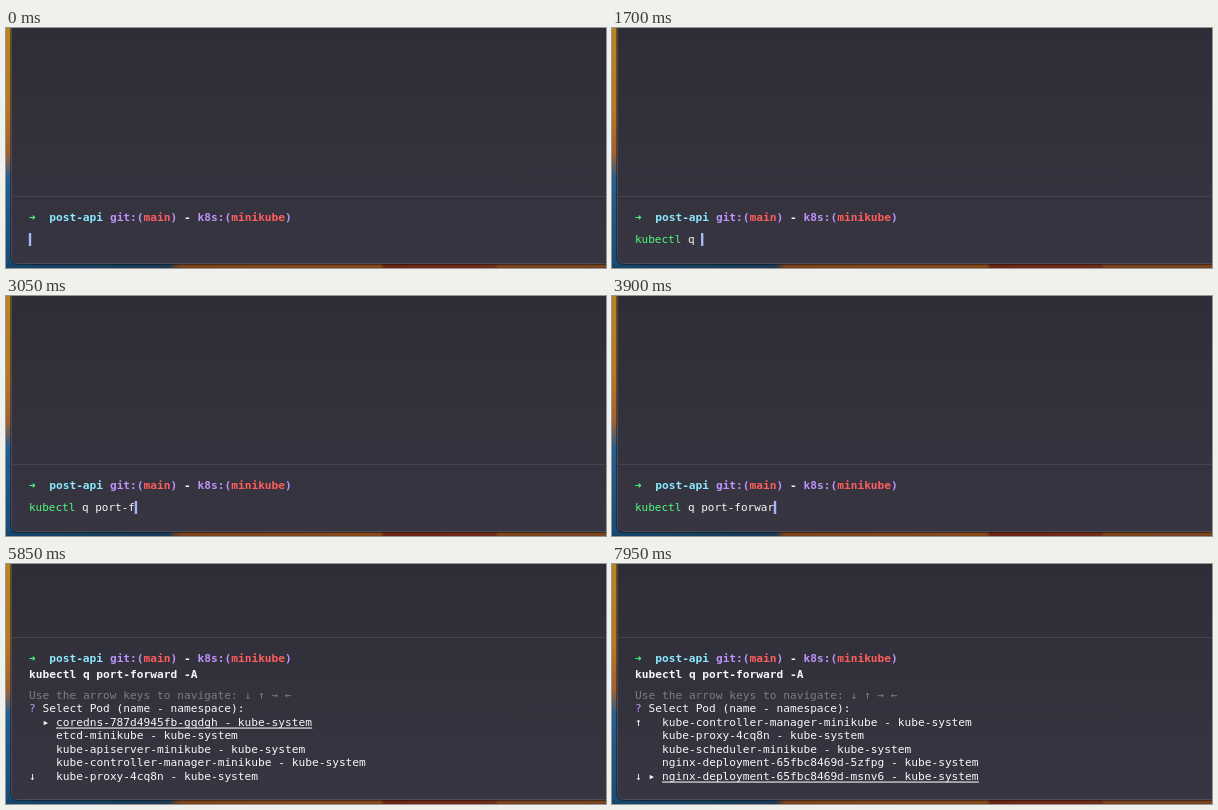
Animation of 600x240 px, one loop 8 s. Source, as an HTML page:

```html
<!DOCTYPE html>
<html lang="en">
<head>
<meta charset="utf-8">
<title>Port forward prompt</title>
<style>
  html, body { margin: 0; width: 100%; height: 100%; overflow: hidden; background: #2e2d37; }
  svg { display: block; width: 600px; height: 240px; font: 11.2px "DejaVu Sans Mono", monospace; }
  text { fill: #f7f7f9; white-space: pre; }
  .bold { font-weight: bold; }
  .input { font-size: 11px; }
  .green { fill: #50fa7b; }
  .cyan { fill: #8be9fd; }
  .purple { fill: #bd93f9; }
  .red { fill: #ff5d5d; }
  .dim { fill: #7e7d85; }
</style>
</head>
<body>
<svg viewBox="0 0 600 240">
  <defs>
    <linearGradient id="side" x2="0" y2="1">
      <stop offset="0" stop-color="#b9851f"/>
      <stop offset=".35" stop-color="#b87622"/>
      <stop offset=".52" stop-color="#a3602f"/>
      <stop offset=".63" stop-color="#235f91"/>
      <stop offset="1" stop-color="#174b74"/>
    </linearGradient>
    <linearGradient id="base">
      <stop offset="0" stop-color="#16466b"/>
      <stop offset=".27" stop-color="#173a56"/>
      <stop offset=".29" stop-color="#7b431d"/>
      <stop offset=".625" stop-color="#85481b"/>
      <stop offset=".63" stop-color="#6c2615"/>
      <stop offset=".815" stop-color="#702d18"/>
      <stop offset=".82" stop-color="#7a431d"/>
      <stop offset="1" stop-color="#774420"/>
    </linearGradient>
    <linearGradient id="pane" x2="0" y2="1">
      <stop offset="0" stop-color="#2e2d37"/>
      <stop offset="1" stop-color="#373541"/>
    </linearGradient>
  </defs>
  <rect width="600" height="240" fill="url(#side)"/>
  <rect y="235" width="600" height="5" fill="url(#base)"/>
  <rect x="5.5" y="-10" width="610" height="245.5" rx="6" stroke="#000" stroke-opacity=".4" stroke-width="3"/>
  <rect x="5.5" y="-10" width="610" height="245.5" rx="6" fill="url(#pane)" stroke="#4c4a52"/>

  <g id="header">
    <path d="M6 .5H600" stroke="#45444e"/>
    <g class="bold">
      <text class="green" x="23" y="25">➜</text>
      <text class="cyan" x="43.2" y="25">post-api</text>
      <text x="103.9" y="25" class="purple">git:(<tspan class="red">main</tspan>)</text>
      <text x="178" y="25">-</text>
      <text x="191.5" y="25" class="purple">k8s:(<tspan class="red">minikube</tspan>)</text>
    </g>
  </g>

  <g id="editor">
    <text class="input" x="23" y="215"><tspan id="command" class="green"></tspan><tspan id="args"></tspan></text>
    <rect id="cursor" y="205" width="2.4" height="13" fill="#a6b5f5"/>
  </g>

  <g id="menu">
    <text class="bold" x="23" y="114">kubectl q port-forward -A</text>
    <text class="dim" x="23" y="134.5">Use the arrow keys to navigate: ↓ ↑ → ←</text>
    <text x="23" y="148"><tspan class="purple">?</tspan> Select Pod (name - namespace):</text>
    <g id="rows"></g>
    <text id="more-up" x="23" y="161.5">↑</text>
    <text x="23" y="215.5">↓</text>
    <text id="pointer" x="36.5">▸</text>
    <rect id="underline" x="50" height="1.1" fill="#f1f1f3"/>
  </g>
</svg>
<script>
  const LOOP = 8000, SUBMIT = 5450, ROWS = 5;
  const INPUT_ADVANCE = 6.62, LIST_ADVANCE = 6.743;
  const FIRST_ROW = 161.5, ROW_HEIGHT = 13.5;
  const line = 'kubectl q port-forward -A';
  const commandLength = line.indexOf(' ');
  const keyTimes = [
    100, 190, 280, 370, 460, 550, 640,
    1300, 1450, 1640, 1900, 2100, 2300,
    2500, 2750, 2950, 3150, 3320, 3500, 3700, 3850,
    4050, 4300, 4600, 4800
  ];
  const moveTimes = [6150, 6430, 6710, 6990, 7270, 7550, 7800];
  const pods = [
    'coredns-787d4945fb-gqdgh', 'etcd-minikube', 'kube-apiserver-minikube',
    'kube-controller-manager-minikube', 'kube-proxy-4cq8n', 'kube-scheduler-minikube',
    'nginx-deployment-65fbc8469d-5zfpg', 'nginx-deployment-65fbc8469d-msnv6'
  ].map(name => name + ' - kube-system');

  const el = id => document.getElementById(id);
  const show = (id, on) => el(id).setAttribute('visibility', on ? 'visible' : 'hidden');
  const set = (id, name, value) => el(id).setAttribute(name, value);
  const countPast = (times, t) => times.filter(time => time <= t).length;
  const rowY = i => FIRST_ROW + i * ROW_HEIGHT;

  const rows = Array.from({ length: ROWS }, (_, i) => {
    const row = document.createElementNS('http://www.w3.org/2000/svg', 'text');
    row.setAttribute('x', 50);
    row.setAttribute('y', rowY(i));
    return el('rows').appendChild(row);
  });

  function drawEditor(t) {
    const typed = countPast(keyTimes, t);
    const idle = t - (keyTimes[typed - 1] || 0);
    el('command').textContent = line.slice(0, Math.min(typed, commandLength));
    el('args').textContent = line.slice(commandLength, Math.max(typed, commandLength));
    set('cursor', 'x', 22.8 + typed * INPUT_ADVANCE);
    set('cursor', 'opacity', idle % 500 < 250 ? 1 : 0);
  }

  function drawMenu(t) {
    const selected = countPast(moveTimes, t);
    const top = Math.max(0, selected - ROWS + 1);
    const y = rowY(selected - top);
    rows.forEach((row, i) => { row.textContent = pods[top + i]; });
    show('more-up', top > 0 && t >= SUBMIT);
    set('pointer', 'y', y);
    set('underline', 'y', y + 2);
    set('underline', 'width', pods[selected].length * LIST_ADVANCE);
  }

  function frame() {
    const t = performance.now() % LOOP;
    const submitted = t >= SUBMIT;
    show('editor', !submitted);
    show('menu', submitted);
    set('header', 'transform', `translate(0 ${submitted ? 73 : 168})`);
    drawEditor(t);
    drawMenu(t);
    requestAnimationFrame(frame);
  }
  frame();
</script>
</body>
</html>
```
